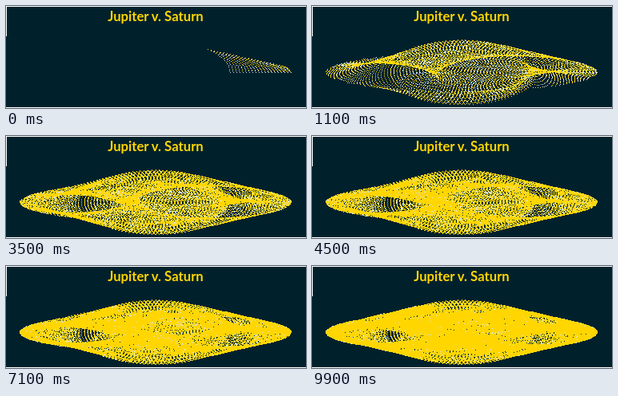
These frames come from a looping animation (375x128 px, 10000 ms). An HTML page with a canvas:

```html
<!DOCTYPE html>
<html lang="en">
<head>
<meta charset="utf-8">
<title>Jupiter v. Saturn</title>
<style>
  html, body { margin: 0; width: 100%; height: 100%; overflow: hidden; background: #00212c; }
  canvas, svg { position: absolute; left: 0; top: 0; width: 375px; height: 128px; }
  text { font: bold 16.7px Lato, "Open Sans", sans-serif; fill: #ffd600; text-anchor: middle; }
</style>
</head>
<body>
<canvas id="stage" width="375" height="128"></canvas>
<svg viewBox="0 0 375 128">
  <path d="M0 0H375V1H1V38H0ZM0 127H375V128H0Z" fill="#fff"/>
  <text x="187" y="19">Jupiter v. Saturn</text>
</svg>
<script>
const W = 375, H = 128, FRAMES = 100, FRAME_MS = 100;
const CX = 186.6, CY = 82.8;
const STEP = 3 * Math.PI / 180;      // Jupiter's advance per line
const LINES = 30, FIRST = 15;        // lines per frame, lines in the opening frame
const GAP = 4;                       // distance between dots on a line
const jupiter = { rx: 93, ry: 40.5, rate: 1 };
const saturn = { rx: 169.6, ry: 24, rate: 11.862 / 29.457 };

const PALE = [216, 232, 236, 255], GOLD = [255, 214, 0, 255];
const ctx = document.getElementById('stage').getContext('2d');
const image = ctx.createImageData(W, H);
const ink = new Float32Array(W * H);
let drawn = 0, shown = -1;

function place(planet, angle) {
  const a = angle * planet.rate;
  return [CX + planet.rx * Math.cos(a), CY - planet.ry * Math.sin(a)];
}

// Mark the nearest pixel; off-centre dots stay pale until hit again.
function dot(px, py) {
  const x = Math.round(px), y = Math.round(py), i = y * W + x;
  ink[i] += (1 - Math.abs(px - x)) * (1 - Math.abs(py - y));
  image.data.set(ink[i] >= 0.5 ? GOLD : PALE, i * 4);
}

function dottedLine(angle) {
  const [jx, jy] = place(jupiter, angle), [sx, sy] = place(saturn, angle);
  const length = Math.hypot(sx - jx, sy - jy);
  for (let d = 0; d <= length; d += GAP) {
    const f = d / length;
    dot(jx + (sx - jx) * f, jy + (sy - jy) * f);
  }
}

function show(frame) {
  if (frame === shown) return;
  if (frame < shown) {
    ink.fill(0);
    image.data.fill(0);
    drawn = 0;
  }
  const total = FIRST + 1 + frame * LINES;
  while (drawn < total) dottedLine(drawn++ * STEP);
  ctx.putImageData(image, 0, 0);
  shown = frame;
}

const start = performance.now();
function tick() {
  const t = Math.max(0, performance.now() - start);
  show(Math.floor(t / FRAME_MS) % FRAMES);
  requestAnimationFrame(tick);
}
tick();
</script>
</body>
</html>
```
